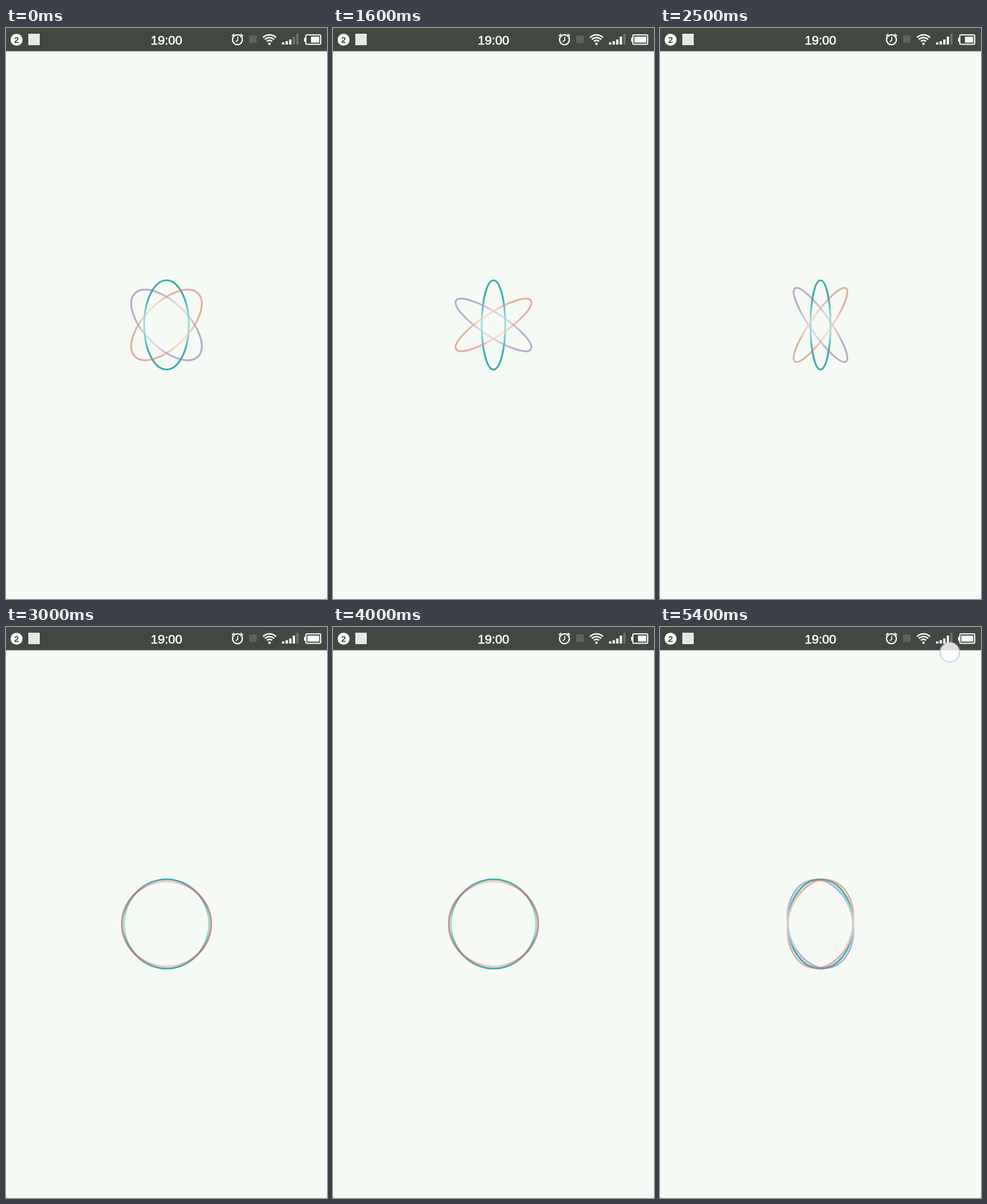
Animation, 561 px wide and 998 px high, one loop 5500 ms. Source, as an HTML page with a canvas:

```html
<!DOCTYPE html>
<html lang="en">
<head>
<meta charset="utf-8">
<title>Orbit loader</title>
<style>
  html, body { margin: 0; width: 100%; height: 100%; overflow: hidden; background: #555; }
  canvas { display: block; border-radius: 2px; }
</style>
</head>
<body>
<canvas id="stage" width="561" height="998"></canvas>
<script>
const ctx = document.getElementById('stage').getContext('2d');
const LOOP = 5500, STEP = 100;
const TAP = 1100, SPIN_START = 1190, SPIN = 1002;
const RADIUS = 78, CX = 280.5, CY = 519;
const BAR = '#434742', WHITE = '#fbfdfa', DIM = '#6d716c';

function rect(color, x, y, w, h) {
  ctx.fillStyle = color;
  ctx.fillRect(x, y, w, h);
}

function disc(color, x, y, r) {
  ctx.fillStyle = color;
  ctx.beginPath();
  ctx.arc(x, y, r, 0, 7);
  ctx.fill();
}

function arc(color, width, x, y, r, from = 0, to = 2 * Math.PI) {
  ctx.strokeStyle = color;
  ctx.lineWidth = width;
  ctx.beginPath();
  ctx.arc(x, y, r, from, to);
  ctx.stroke();
}

function label(text, x, y, font, color) {
  ctx.font = font + ' "Liberation Sans", Arial, sans-serif';
  ctx.textAlign = 'center';
  ctx.fillStyle = color;
  ctx.fillText(text, x, y);
}

// cubic-bezier(.4, 0, .2, 1), solved by bisection
function ease(x) {
  let lo = 0, hi = 1, u = 0.5;
  for (let i = 0; i < 24; i++) {
    u = (lo + hi) / 2;
    const v = 1 - u;
    if (1.2 * v * v * u + 0.6 * v * u * u + u ** 3 < x) lo = u; else hi = u;
  }
  return 3 * (1 - u) * u * u + u ** 3;
}

// Width ratio of the rings and tilt in degrees
function pose(t) {
  if (t < TAP) return [0.5, 45];
  if (t < SPIN_START) return [1, 0];
  const p = ease((t - SPIN_START) / SPIN % 1);
  return [Math.abs(1 - 2 * p), 90 * p];
}

function ring(ratio, degrees, dark, light, alpha) {
  const shade = ctx.createLinearGradient(0, -RADIUS, 0, RADIUS);
  [0, 0.2, 0.43, 0.57, 0.8, 1].forEach((at, i) =>
    shade.addColorStop(at, i === 2 || i === 3 ? light : dark));
  ctx.save();
  ctx.translate(CX, CY);
  ctx.rotate(degrees * Math.PI / 180);
  ctx.globalAlpha = alpha;
  ctx.strokeStyle = shade;
  ctx.lineWidth = 3.2;
  ctx.beginPath();
  ctx.ellipse(0, 0, RADIUS * ratio, RADIUS, 0, 0, 2 * Math.PI);
  ctx.stroke();
  ctx.restore();
}

function alarm(x, y) {
  arc(WHITE, 2.3, x, y, 8.6);
  arc(WHITE, 2, x, y, 11.2, 3.7, 4.2);
  arc(WHITE, 2, x, y, 11.2, 5.22, 5.72);
  ctx.lineWidth = 1.7;
  ctx.beginPath();
  ctx.moveTo(x + 0.5, y - 5);
  ctx.lineTo(x + 0.5, y + 1);
  ctx.lineTo(x - 3, y + 3.5);
  ctx.stroke();
}

function statusBar(t) {
  rect(BAR, 0, 0, 561, 40.6);
  disc(WHITE, 18.5, 20.5, 10.5);
  label('2', 18.5, 26, 'bold 15px', BAR);
  rect('#e6e8e5', 39, 10, 20, 20);

  label('19:00', 280.5, 29, '22px', WHITE);
  ctx.strokeStyle = WHITE;
  ctx.lineWidth = 0.7;
  ctx.strokeText('19:00', 280.5, 29);

  alarm(404.5, 20.5);
  rect('#5f635e', 425, 13, 13, 13);

  disc(WHITE, 460.5, 27.5, 2.2);
  for (const r of [6.5, 11.3, 16]) arc(WHITE, 2.6, 460.5, 28, r, -2.36, -0.78);

  const strength = t < 1500 ? 3 : 4;
  [4, 6, 9, 14, 19].forEach((h, i) =>
    rect(i < strength ? WHITE : DIM, 482.5 + 6.2 * i, 29 - h, 4, h));

  ctx.strokeStyle = WHITE;
  ctx.lineWidth = 2;
  ctx.beginPath();
  ctx.roundRect(524, 12, 26, 16.5, 2);
  ctx.stroke();
  rect(WHITE, 521, 17, 2.5, 7);
  const charge = t % 2000 < 1000 ? 14.5 : 21;
  rect(WHITE, 547.5 - charge, 15, charge, 10.5);
}

function touch(x, y) {
  disc('rgba(255,255,255,.82)', x, y, 17);
  arc('rgba(185,183,214,.55)', 2.4, x, y, 17);
}

function draw(t) {
  rect('#f5faf5', 0, 0, 561, 998);
  const [ratio, tilt] = pose(t);
  ring(ratio, 0, '#3dacad', '#97e3dd', 1);
  ring(ratio, -tilt, '#9379b0', '#d0bfe0', 0.6);
  ring(ratio, tilt, '#da7b67', '#ffc5b3', 0.6);
  statusBar(t);
  if (t >= 1000 && t < 1200) {
    ctx.globalAlpha = 0.6;
    touch(345, 576);
    ctx.globalAlpha = 1;
  }
  if (t >= 5400) touch(506.5, 44);
}

function tick() {
  draw(Math.floor(performance.now() % LOOP / STEP) * STEP);
  requestAnimationFrame(tick);
}
tick();
</script>
</body>
</html>
```
